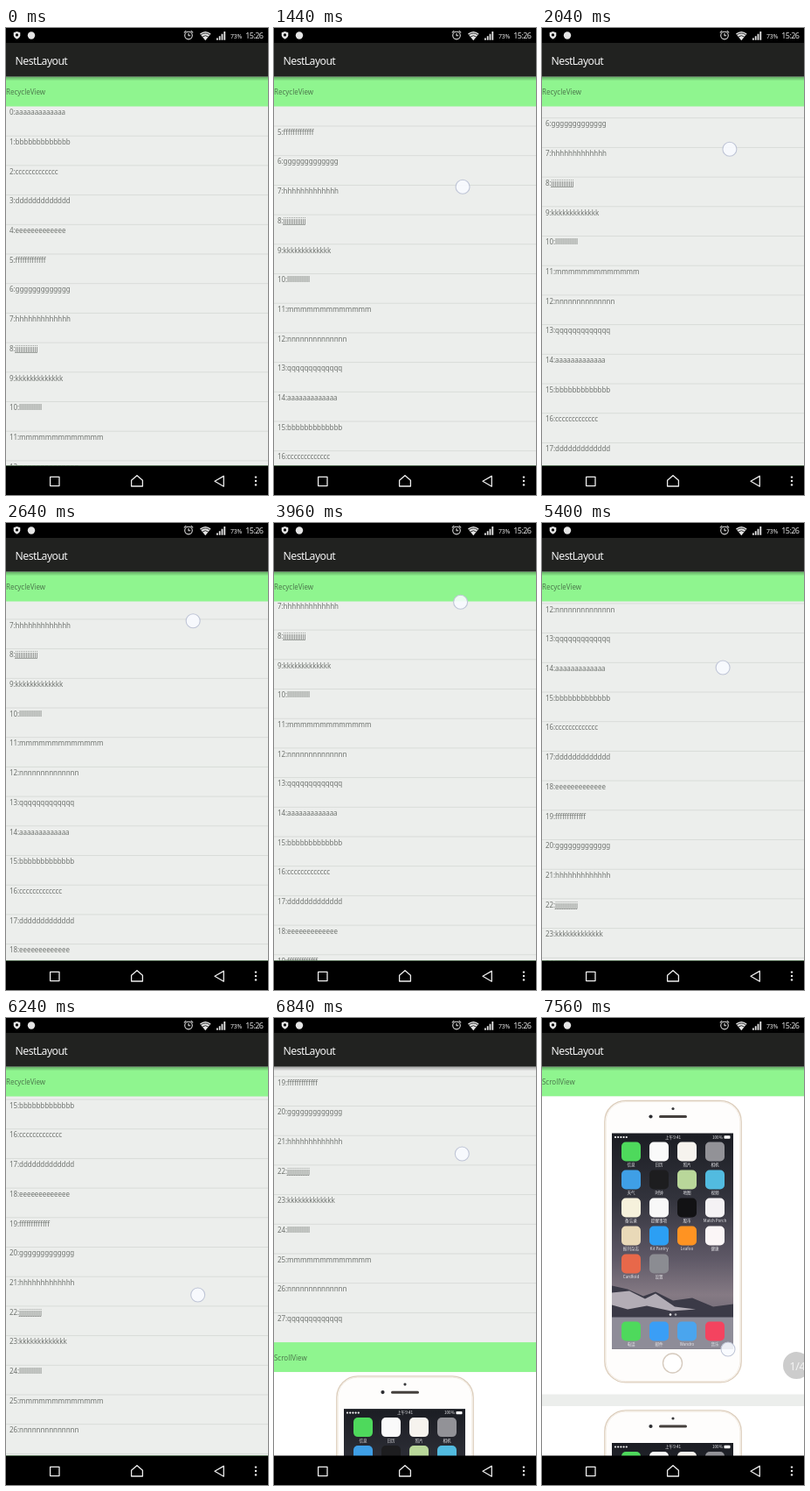
Animation of 300 by 533 pixels, one loop 8 s. Source, as an HTML page:

```html
<!DOCTYPE html>
<html lang="en">
<head>
<meta charset="utf-8">
<title>NestLayout</title>
<style>
html, body { margin: 0; width: 100%; height: 100%; overflow: hidden; background: #000; }
svg { display: block; width: 100%; height: 100%; }
text { font-family: "Noto Sans", "Open Sans", sans-serif; }
.row { font-size: 8px; letter-spacing: -.07px; fill: #6f736f; }
.head { font-size: 8px; letter-spacing: -.02px; fill: #4d7a4d; }
.title { font-size: 12.2px; letter-spacing: -.55px; fill: #f4f4f4; }
.tiny { font-family: "Noto Sans CJK SC", "Noto Sans CJK", "Noto Sans", sans-serif; font-size: 4.6px; fill: #e8e8ec; }
.mid { text-anchor: middle; }
</style>
</head>
<body>
<svg id="stage" viewBox="0 0 300 533">
  <defs>
    <linearGradient id="sky" x1="0" y1="0" x2="0" y2="1">
      <stop offset="0" stop-color="#1b1d23"/>
      <stop offset=".3" stop-color="#32333c"/>
      <stop offset=".58" stop-color="#5e5866"/>
      <stop offset=".75" stop-color="#857a84"/>
      <stop offset="1" stop-color="#565463"/>
    </linearGradient>
    <linearGradient id="shade" x1="0" y1="0" x2="0" y2="1">
      <stop offset="0" stop-color="#000" stop-opacity=".32"/>
      <stop offset="1" stop-color="#000" stop-opacity="0"/>
    </linearGradient>
    <!-- one picture of the lower pane, origin at its top left -->
    <g id="picture">
      <rect width="300" height="340" fill="#fff"/>
      <rect x="71.8" y="4.8" width="156.4" height="321.6" rx="24" fill="#fefdfc" stroke="#dccdbb" stroke-width="1.3"/>
      <rect x="73.2" y="6.2" width="153.6" height="318.8" rx="22.5" fill="none" stroke="#f3ece3"/>
      <circle cx="150" cy="14" r="1.6" fill="#3a3a3c"/>
      <circle cx="124.5" cy="23" r="2.1" fill="#2c2c30"/>
      <rect x="134" y="21.6" width="32" height="3" rx="1.5" fill="#45403d"/>
      <rect x="80" y="42" width="139" height="246" fill="url(#sky)"/>
      <path d="M80 216L98 220L116 228L130 223L150 233L172 230L196 240L219 237V288H80Z" fill="#3b3a47"/>
      <path d="M80 224L100 222L118 231L130 225L152 240L176 243L148 245L120 239L98 243L80 238Z" fill="#b3adb6"/>
      <rect x="80" y="252" width="139" height="36" fill="#a3a0ad" opacity=".8"/>
      <g id="apps"></g>
      <circle cx="147" cy="249" r="1.3" fill="#fff"/>
      <circle cx="153" cy="249" r="1.3" fill="#fff" opacity=".55"/>
      <circle cx="149.5" cy="304.5" r="11" fill="#fff" stroke="#d6cbbf" stroke-width="1.4"/>
      <circle cx="291.5" cy="307" r="15.5" fill="#c6c6c6" opacity=".9"/>
      <text x="283.5" y="312" font-size="12.5" letter-spacing="-.4" fill="#f4f4f4">1/4</text>
    </g>
  </defs>

  <rect width="300" height="533" fill="#eceeec"/>
  <g transform="translate(0 -.5)">
    <g id="page">
      <g id="list"></g>
      <rect y="56" width="300" height="34" fill="#8ff58f"/>
      <text class="head" x="0" y="76.8">RecycleView</text>
      <rect y="500" width="300" height="500" fill="#eceeec"/>
      <rect y="500" width="300" height="34" fill="#8ff58f"/>
      <text class="head" x="0" y="520.8">ScrollView</text>
      <use href="#picture" y="534"/>
      <use href="#picture" y="887.5"/>
    </g>
  </g>
  <rect y="55.5" width="300" height="5" fill="url(#shade)"/>

  <circle id="touch" r="8" fill="#f8faff" fill-opacity=".88" stroke="#bfc5d6" stroke-width="1.1"/>

  <rect width="300" height="17" fill="#000"/>
  <rect y="17" width="300" height="38.5" fill="#212220"/>
  <text class="title" x="10.6" y="41.8">NestLayout</text>
  <g fill="#e6e6e6">
    <path d="M12.5 4L16.3 5.3V8.3Q16.1 11 12.5 12.7Q8.9 11 8.7 8.3V5.3Z"/>
    <circle cx="12.5" cy="7.9" r="1.6" fill="#000"/>
    <circle cx="29" cy="8.5" r="4.2"/>
    <path d="M222 6.5Q228.3 1.5 234.6 6.5L228.3 14.2Z"/>
    <path d="M223.2 7.8Q228.3 4 233.4 7.8M225 10Q228.3 7.4 231.6 10" fill="none" stroke="#000" stroke-width=".8"/>
    <path d="M241 11.5h1.8v2.2H241zM243.8 9.2h1.8v4.5h-1.8zM246.6 6.7h1.8v7h-1.8zM249.4 4h1.8v9.7h-1.8z"/>
    <text x="257" y="11.5" font-size="7" letter-spacing="-.3">73%</text>
    <text x="274.2" y="12" font-size="9" letter-spacing="-.55">15:26</text>
  </g>
  <g fill="none" stroke="#dcdcdc" stroke-width="1.1">
    <circle cx="209" cy="8.6" r="4.3"/>
    <path d="M209 6V8.8H211.2M203.8 5.4L206.3 3.2M214.2 5.4L211.7 3.2"/>
  </g>

  <rect y="499.5" width="300" height="34" fill="#000"/>
  <g fill="none" stroke="#ededed" stroke-width="1.3" stroke-linejoin="round">
    <rect x="50.6" y="512.4" width="10.4" height="10.2"/>
    <path d="M143.6 516.3L150 510.8L156.4 516.3V523H143.6Z"/>
    <path d="M249.3 511.4V523.2L239 517.3Z"/>
  </g>
  <g fill="#ededed">
    <circle cx="286" cy="512.6" r="1.2"/><circle cx="286" cy="517" r="1.2"/><circle cx="286" cy="521.4" r="1.2"/>
  </g>
</svg>
<script>
const LOOP = 8000, STEP = 120, LAST = 7560;
const PITCH = 33.7, ROWS = 28, TOP = 90;
const LIST_MAX = ROWS * PITCH - 410, PAGE_MAX = 444;
const $ = id => document.getElementById(id);

function add(parent, tag, attrs, label) {
  const el = document.createElementNS("http://www.w3.org/2000/svg", tag);
  for (const k in attrs) el.setAttribute(k, attrs[k]);
  if (label) el.textContent = label;
  return parent.appendChild(el);
}

function buildList() {
  const letters = "abcdefghjklmnq";
  for (let i = 0; i < ROWS; i++) {
    const y = TOP + i * PITCH, c = letters[i % letters.length];
    if (i) add($("list"), "rect", { y: y - .5, width: 300, height: 1, fill: "#d9dcd9" });
    add($("list"), "text", { class: "row", x: 4, y: y + 9.7 }, i + ":" + c.repeat(c === "n" ? 14 : 13));
  }
}

function buildApps() {
  const apps = $("apps");
  const grid = [
    ["信息", "#4ed95c"], ["日历", "#fafafa"], ["照片", "#f6f3ee"], ["相机", "#929297"],
    ["天气", "#3f9fe6"], ["时钟", "#1d1d1f"], ["地图", "#b9d79a"], ["视频", "#52bbe0"],
    ["备忘录", "#f6f1dc"], ["提醒事项", "#f8f8f8"], ["股市", "#121214"], ["Match Porch", "#f4f2f4"],
    ["报刊杂志", "#e9d9b8"], ["Kit Pantry", "#2c9ff4"], ["Leafoo", "#ff9322"], ["健康", "#fbf6f7"],
    ["Cardfold", "#e8684a"], ["设置", "#8b8c92"]
  ];
  const dock = [["电话", "#4ed95c"], ["邮件", "#3a9ef6"], ["Wandro", "#4aa5ee"], ["音乐", "#f4435f"]];
  const icon = ([name, fill], i, y) => {
    const x = 102 + 32 * (i % 4);
    add(apps, "rect", { x: x - 11, y: y - 11, width: 22, height: 22, rx: 5, fill });
    add(apps, "text", { class: "tiny mid", x, y: y + 16.8 }, name);
  };
  grid.forEach((a, i) => icon(a, i, 63 + 32 * Math.floor(i / 4)));
  dock.forEach((a, i) => icon(a, i, 268));
  for (let i = 0; i < 5; i++) add(apps, "circle", { cx: 84 + 3.2 * i, cy: 46.5, r: 1.1, fill: "#fff" });
  add(apps, "text", { class: "tiny mid", x: 150, y: 48.3 }, "上午9:41");
  add(apps, "text", { class: "tiny", x: 195, y: 48.3 }, "100%");
  add(apps, "rect", { x: 208.5, y: 44.8, width: 7, height: 3.4, rx: .8, fill: "#fff" });
}

// total scroll: first through the list, then through the page
const scrollKeys = [
  [0, 0], [240, 0], [360, 4], [1440, 146], [2640, 215.5], [3960, 237], [4320, 239], [4560, 239],
  [5400, 402], [5760, 460], [6120, 490], [6240, 502], [6840, 663], [7080, 735],
  [7440, LIST_MAX + PAGE_MAX], [LOOP, LIST_MAX + PAGE_MAX]
];

// monotone cubic through the keys
function curve(keys, t) {
  const slope = i => (keys[i + 1][1] - keys[i][1]) / (keys[i + 1][0] - keys[i][0]);
  const tangent = i => {
    if (i === 0 || i === keys.length - 1) return 0;
    const a = slope(i - 1), b = slope(i);
    return a * b > 0 ? 2 * a * b / (a + b) : 0;
  };
  let i = 0;
  while (i < keys.length - 2 && t >= keys[i + 1][0]) i++;
  const [t0, a] = keys[i], [t1, b] = keys[i + 1], h = t1 - t0, u = (t - t0) / h;
  const u2 = u * u, u3 = u2 * u;
  return a * (2 * u3 - 3 * u2 + 1) + b * (3 * u2 - 2 * u3)
    + h * (tangent(i) * (u3 - 2 * u2 + u) + tangent(i + 1) * (u3 - u2));
}

// each drag carries the content along with the finger
const drags = [
  { from: 120, to: 4320, x: 220, y: 327.3, scroll: 0 },
  { from: 4560, to: 5760, x: 211.5, y: 328, scroll: 239 },
  { from: 6120, to: 7080, x: 220, y: 328, scroll: 490 },
  { from: 7560, to: LOOP, x: 213, y: 378, scroll: LIST_MAX + PAGE_MAX }
];

function draw(time) {
  const t = Math.min(Math.floor(time / STEP) * STEP, LAST);
  const s = curve(scrollKeys, t);
  const inner = Math.min(s, LIST_MAX), outer = s - inner;
  $("list").setAttribute("transform", `translate(0 ${-inner})`);
  $("page").setAttribute("transform", `translate(0 ${-outer})`);

  const drag = drags.find(d => t >= d.from && t < d.to);
  $("touch").setAttribute("visibility", drag ? "visible" : "hidden");
  if (drag) {
    const d = s - drag.scroll;
    $("touch").setAttribute("transform", `translate(${drag.x - d * .027} ${drag.y - d})`);
  }
}

buildList();
buildApps();
const start = performance.now();
function tick() {
  draw((performance.now() - start) % LOOP);
  requestAnimationFrame(tick);
}
tick();
</script>
</body>
</html>
```
